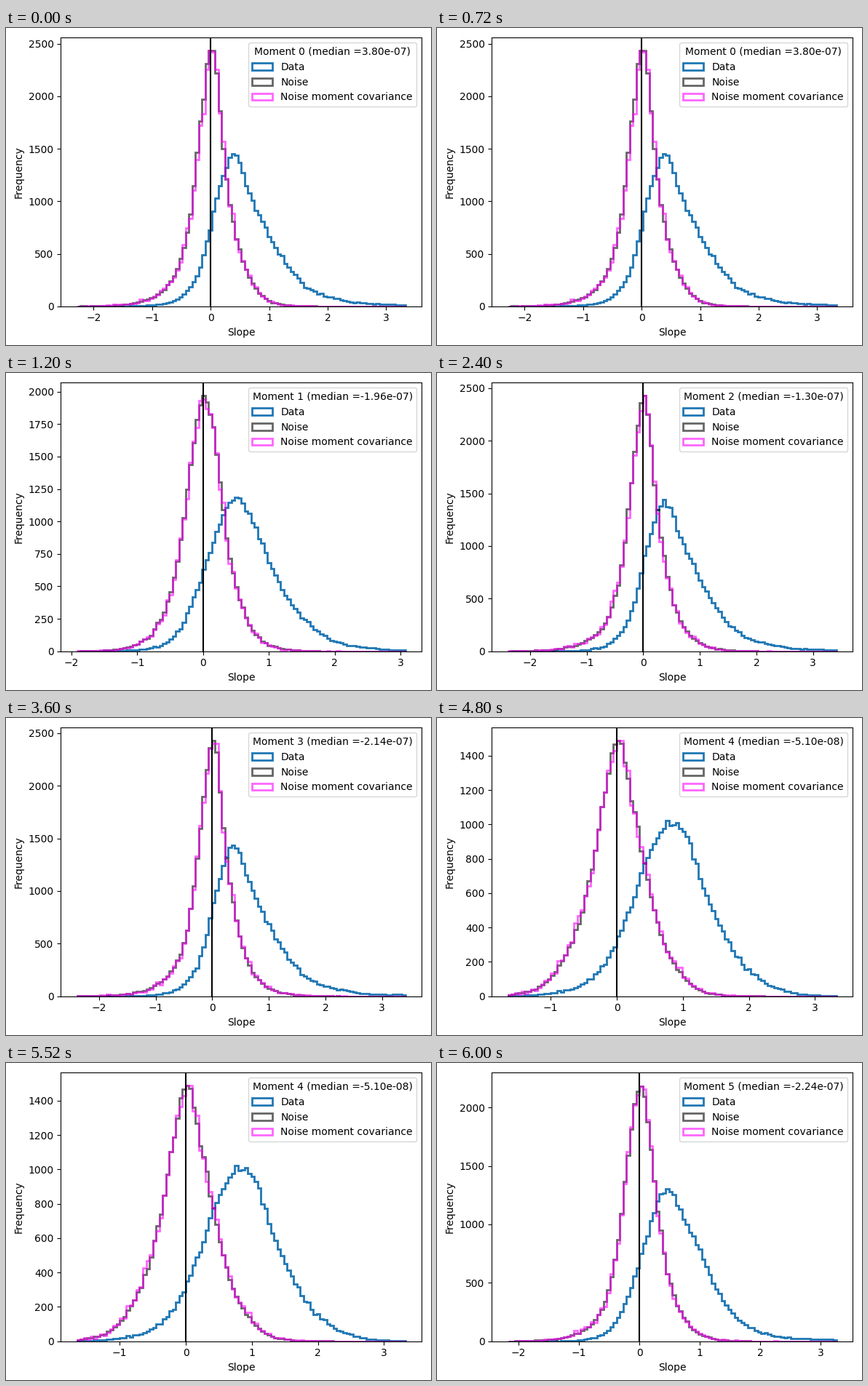
A matplotlib script for the animation above (7.2 s loop, 584 by 436 pixels).

```python
import numpy as np
import matplotlib.pyplot as plt
from matplotlib.animation import FuncAnimation

W, H, DPI = 584, 436, 100
LEFT, BOTTOM, WIDTH, HEIGHT = 75.28, 53.28, 496, 369.6
BINS = 100
STYLES = (("Data", "tab:blue", 1),
          ("Noise", "black", 0.6),
          ("Noise moment covariance", "magenta", 0.6))

plt.rcParams["font.family"] = "DejaVu Sans"
fig = plt.figure(figsize=(W / DPI, H / DPI), dpi=DPI, facecolor="white")
ax = fig.add_axes([LEFT / W, BOTTOM / H, WIDTH / W, HEIGHT / H])
panels = []


def curve(first, step, counts):
    """Smooth counts per bin through evenly spaced key points, in log space.

    Beyond the key points the curve decays exponentially.
    """
    y = np.log(counts)
    y = np.concatenate([[2 * y[0] - y[1]], y, [2 * y[-1] - y[-2]]])
    slope = np.gradient(y)
    u = (np.arange(BINS) - first) / step + 1
    i = np.clip(np.floor(u).astype(int), 0, len(y) - 2)
    t = np.clip(u - i, 0, 1)
    smooth = (y[i] * (1 + 2 * t) * (1 - t) ** 2
              + slope[i] * t * (1 - t) ** 2
              + y[i + 1] * t ** 2 * (3 - 2 * t)
              + slope[i + 1] * t ** 2 * (t - 1))
    outside = (u - i - t) * np.where(u < 0, slope[0], slope[-1])
    return np.exp(smooth + outside)


def scatter(y, amount, rng):
    """Add counting noise, which grows with the square root of the count."""
    return np.clip(np.round(y + amount * np.sqrt(y) * rng.normal(size=BINS)),
                   0, None)


def add_panel(median, zero, unit, data, noise):
    """zero and unit are the x axis origin and scale in pixels."""
    rng = np.random.default_rng(len(panels))
    peak = max(noise[-1])
    data_y = scatter(curve(*data), 0.5, rng)
    noise_y = np.minimum(scatter(curve(*noise), 0.5, rng), peak)
    cov_y = np.minimum(scatter(noise_y, 1, rng), peak)
    lo = (LEFT - zero) / unit
    panels.append(dict(
        title=f"Moment {len(panels)} (median ={median:.2e})",
        xlim=(lo, lo + WIDTH / unit),
        ylim=(0, peak * 1.05),
        series=(data_y, noise_y, cov_y)))


# Key points are (first bin, bins between points, counts).
steep_data = (29, 6, [55, 232, 880, 1418, 1000, 622, 330, 152, 82, 44, 23, 17])
steep_noise = (25, 4, [135, 270, 640, 1600, 2432, 1330, 570, 235, 100])

add_panel(3.80e-07, 281.2, 80.4, steep_data,
          (25, 4, [140, 300, 690, 1740, 2437, 1215, 530, 225, 75]))
add_panel(-1.96e-07, 270.8, 90.5,
          (29, 6, [115, 410, 850, 1170, 1000, 640, 360, 195, 90, 45, 25, 14]),
          (22, 4, [135, 310, 700, 1440, 1972, 1520, 720, 330, 130]))
add_panel(-1.30e-07, 283.3, 77.8, steep_data, steep_noise)
add_panel(-2.14e-07, 283.3, 77.8, steep_data, steep_noise)
add_panel(-5.10e-08, 247, 90.75,
          (24, 6, [95, 230, 480, 815, 990, 930, 575, 340, 165, 82, 30, 11]),
          (9, 4, [55, 120, 245, 425, 735, 1190, 1489, 1180, 760, 430, 220,
                  115, 45]))
add_panel(-2.24e-07, 278.1, 83,
          (29, 6, [75, 325, 830, 1300, 1060, 690, 350, 160, 75, 38, 22, 17]),
          (24, 4, [130, 275, 690, 1580, 2189, 1370, 590, 260, 100]))


def draw(i):
    p = panels[i]
    ax.clear()
    lo, hi = p["xlim"]
    margin = (hi - lo) / 22
    edges = np.linspace(lo + margin, hi - margin, BINS + 1)
    mids = (edges[:-1] + edges[1:]) / 2
    for y, (label, color, alpha) in zip(p["series"], STYLES):
        ax.hist(mids, bins=edges, weights=y, histtype="step", lw=2,
                color=color, alpha=alpha, label=label)
    ax.axvline(0, color="black")
    ax.set(xlim=p["xlim"], ylim=p["ylim"], xlabel="Slope", ylabel="Frequency")
    ax.legend(title=p["title"], loc="upper right")
    return []


anim = FuncAnimation(fig, draw, frames=len(panels), interval=1200,
                     init_func=lambda: draw(0), repeat=True, repeat_delay=0)
plt.show()
```
